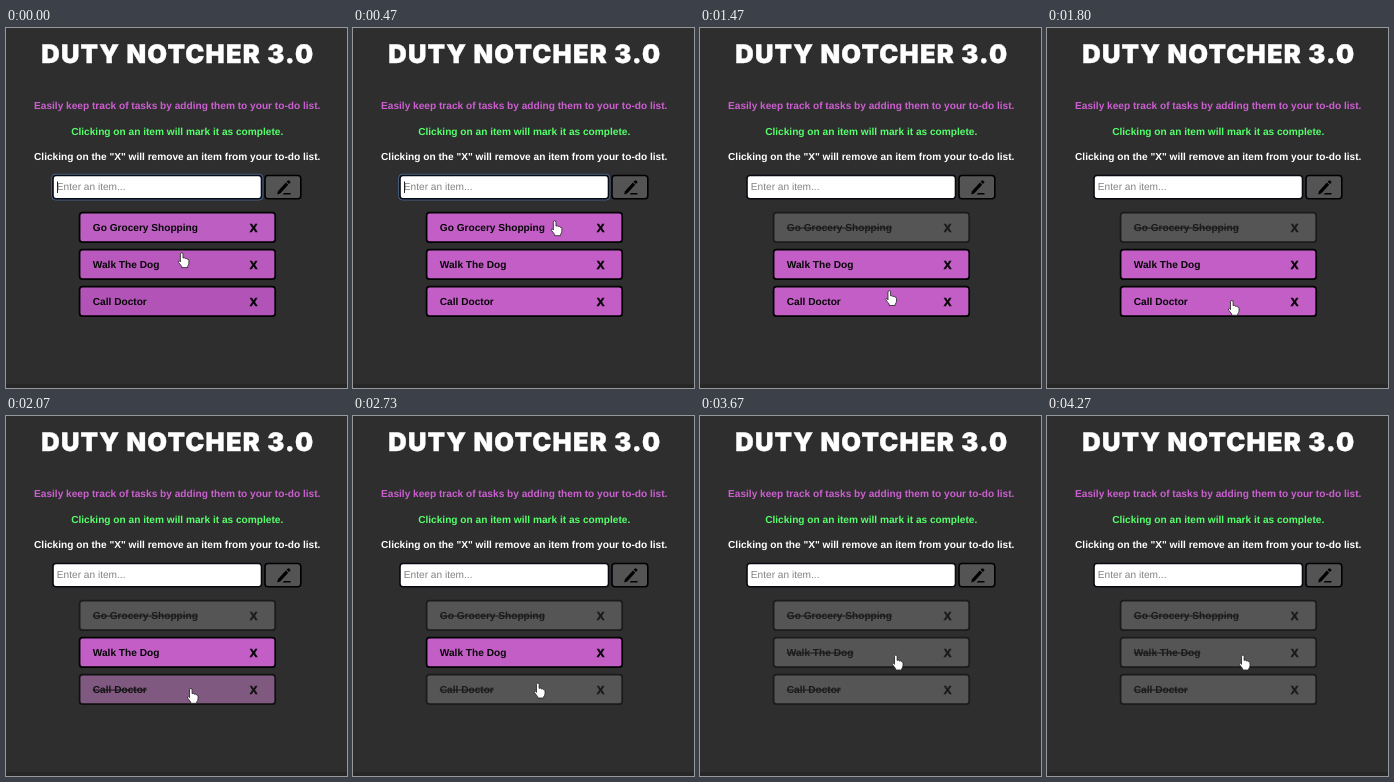
These frames come from a looping animation (341x360 px, 4.39 s). An HTML page:

```html
<!DOCTYPE html>
<html lang="en">
<head>
<meta charset="utf-8">
<title>Duty Notcher 3.0</title>
<style>
  html, body { margin: 0; width: 100%; height: 100%; overflow: hidden; background: #2e2e2e; }
  svg { display: block; width: 100%; height: 100%; }
  text { font: bold 10.15px "Liberation Sans", Arial, sans-serif; text-rendering: geometricPrecision; }
  .mid { text-anchor: middle; }
  .title { font: 900 25.5px Inter, "Open Sans", sans-serif; letter-spacing: 1.2px; fill: #fff; stroke: #fff; stroke-width: .4; }
  .hint { font-weight: normal; fill: #838383; }
  .x { font-size: 11.5px; stroke-width: .5; }
  .done { text-decoration: line-through; }
</style>
</head>
<body>
<svg viewBox="0 0 341 360">
  <rect width="341" height="360" fill="#2e2e2e"/>
  <rect y="356" width="341" height="4" fill="#272727"/>
  <text class="mid title" x="171.8" y="35">DUTY NOTCHER 3.0</text>
  <text class="mid" x="171.2" y="81" fill="#cb5fd0">Easily keep track of tasks by adding them to your to-do list.</text>
  <text class="mid" x="171.2" y="106.5" fill="#55ff6c">Clicking on an item will mark it as complete.</text>
  <text class="mid" x="171.2" y="132" fill="#fff">Clicking on the "X" will remove an item from your to-do list.</text>

  <rect id="ring" x="45.8" y="146.3" width="211" height="25.6" rx="3.5" fill="none" stroke="#4d6d9c"/>
  <rect x="47" y="147.5" width="208.5" height="23.2" rx="3" fill="#fff" stroke="#080a12" stroke-width="1.6"/>
  <text class="hint" x="50.8" y="162">Enter an item...</text>
  <path id="caret" d="M51.5 153.5V165" stroke="#222"/>

  <rect x="259" y="147.5" width="35.8" height="23.2" rx="3" fill="#545454" stroke="#000" stroke-width="1.6"/>
  <path d="M271.2 166.4L271.9 163.2L279.9 154.6L282.2 156.8L274.2 165.4ZM280.6 153.8L281.9 152.5Q282.5 152 283.1 152.5L284.2 153.6Q284.7 154.2 284.2 154.8L282.9 156.1ZM276.6 166.6L278 165H284.5V166.6Z"/>

  <g id="list"></g>
  <path id="hand" fill="#fff" stroke="#222" stroke-width=".8" stroke-linejoin="round"
    d="M-3.4 2V-5.8Q-3.3 -7.3 -2.1 -7.3T-.8 -5.8V-2Q.8 -2.8 1.4 -1.5Q3 -2.1 3.4 -.8Q5 -1.2 5.1 .6V3.2Q5 5 3.8 6.3V7.6H-2.2V6.3L-5.3 2.3Q-5.9 1 -4.8 .6Q-4 .6 -3.4 2Z"/>
</svg>
<script>
const LOOP = 4390, FADE = 500, BLUR = 560;
const tasks = [
  { name: "Go Grocery Shopping", click: 590, start: [189, 95, 194] },
  { name: "Walk The Dog", click: 3195, start: [185, 89, 190] },
  { name: "Call Doctor", click: 1895, start: [178, 84, 183] }
];
// time, x, y of the pointer
const path = [
  [0, 177.8, 232], [70, 177.8, 232], [480, 203.8, 200], [850, 203.8, 200], [1400, 191.8, 269],
  [1800, 186.9, 279.7], [2130, 186.9, 279.7], [2480, 186.9, 274.4], [2730, 186.9, 274.4],
  [3100, 197.9, 246.4], [LOOP, 197.9, 246.4]
];
const $ = id => document.getElementById(id);

function add(parent, tag, attrs, text = "") {
  const el = document.createElementNS("http://www.w3.org/2000/svg", tag);
  for (const key in attrs) el.setAttribute(key, attrs[key]);
  el.textContent = text;
  return parent.appendChild(el);
}

tasks.forEach((task, i) => {
  const y = 184 + 37 * i;
  task.box = add($("list"), "rect", { x: 73.6, y: y + .6, width: 195.6, height: 29.6, rx: 3, "stroke-width": 1.7 });
  task.label = add($("list"), "text", { x: 86.8, y: y + 18.7 }, task.name);
  task.cross = add($("list"), "text", { x: 247.6, y: y + 20.3, class: "mid x" }, "X");
});

const clamp = v => Math.min(1, Math.max(0, v));
const smooth = p => p * p * (3 - 2 * p);
const mix = (a, b, p) => `rgb(${a.map((v, i) => Math.round(v + (b[i] - v) * p))})`;
const gray = v => [v, v, v];

// CSS "ease": cubic-bezier(.25, .1, .25, 1)
function ease(p) {
  const bez = (u, a, b) => 3 * u * (1 - u) ** 2 * a + 3 * u * u * (1 - u) * b + u ** 3;
  let lo = 0, hi = 1;
  for (let i = 0; i < 20; i++) {
    const u = (lo + hi) / 2;
    if (bez(u, .25, .25) < p) lo = u; else hi = u;
  }
  return bez(lo, .1, 1);
}

function draw(t) {
  for (const { click, start, box, label, cross } of tasks) {
    const p = ease(clamp((t - click) / FADE));
    box.setAttribute("fill", mix(t < 70 ? start : [194, 94, 198], gray(85), p));
    box.setAttribute("stroke", mix(gray(0), gray(27), p));
    const ink = mix(gray(6), gray(27), p);
    label.setAttribute("fill", ink);
    cross.setAttribute("fill", ink);
    cross.setAttribute("stroke", ink);
    label.classList.toggle("done", t >= click);
  }
  const focus = t < BLUR ? "visible" : "hidden";
  $("ring").setAttribute("visibility", focus);
  $("caret").setAttribute("visibility", focus);

  const i = path.findIndex(k => k[0] > t);
  const [t0, x0, y0] = path[i - 1], [t1, x1, y1] = path[i];
  const p = smooth((t - t0) / (t1 - t0));
  $("hand").setAttribute("transform", `translate(${x0 + (x1 - x0) * p} ${y0 + (y1 - y0) * p})`);
}

const begin = performance.now();
function tick() {
  draw((performance.now() - begin) % LOOP);
  requestAnimationFrame(tick);
}
tick();
</script>
</body>
</html>
```
